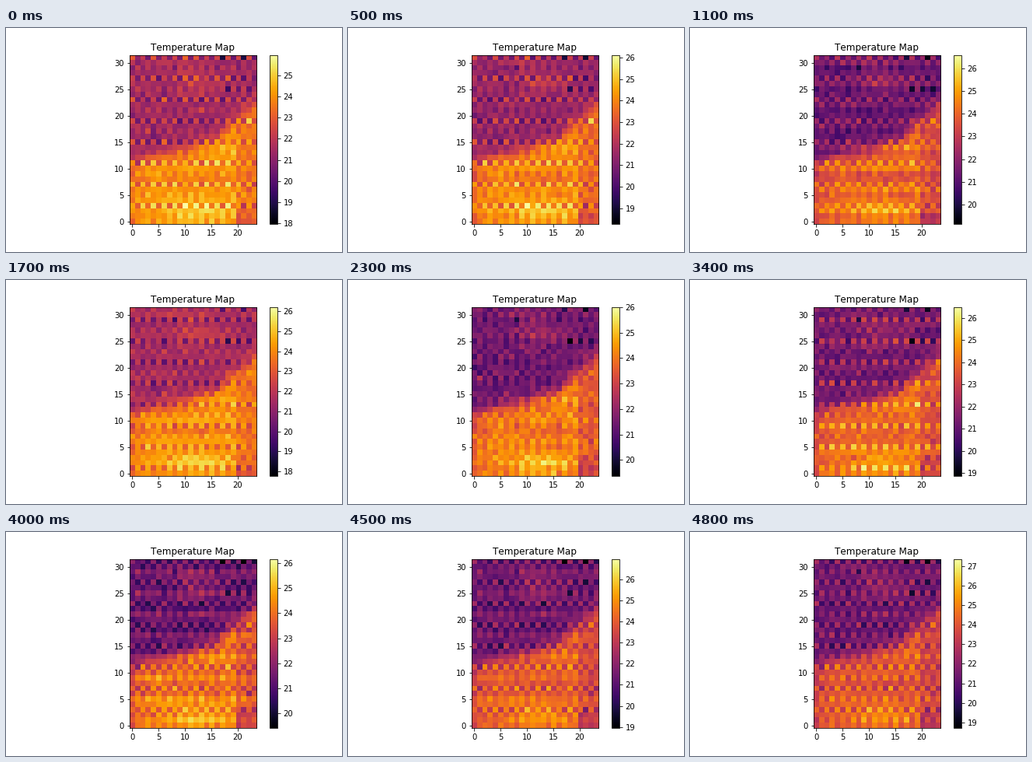
Recreate the animation shown at these times as a matplotlib script. Size 432 by 288 pixels, loop 5000 ms.

```python
import numpy as np
import matplotlib.pyplot as plt
from matplotlib.animation import FuncAnimation
from matplotlib.ticker import MultipleLocator

COLS, ROWS = 24, 32
STEP, FRAMES = 100, 50        # ms per frame, frames per loop
READINGS = 18
PERIOD = 4800 / 17            # ms between sensor readings

plt.rcParams.update({"font.family": "DejaVu Sans", "font.size": 10,
                     "text.kerning_factor": 6})

# Key points of the colour range, by reading
RANGE_KEYS = [0, 4, 6, 8, 12, 14, 17]
LOWS = [17.97, 19.14, 17.77, 19.37, 18.86, 19.42, 18.72]
HIGHS = [25.97, 26.6, 26.22, 26.01, 26.5, 26.16, 27.36]

COLD_SPOTS = [(8, 29), (18, 25), (20, 25), (22, 25), (17, 31), (21, 31)]

x, y = np.meshgrid(np.arange(COLS), np.arange(ROWS))


def bump(cx, cy, width, height):
    return np.exp(-((x - cx) / width) ** 2 - ((y - cy) / height) ** 2)


def scene():
    """Warm silhouette with a rising right shoulder in a cool room."""
    edge = np.interp(x, [0, 6, 11, 16, 18, 23], [11.5, 12.5, 14, 15.8, 18, 22.2])
    warm = 1 / (1 + np.exp((y - edge) / 0.7))
    hot = 24.1 - 0.6 * np.exp(-x / 1.5) - 0.3 * bump(10, 8, 20, 1)
    hot += 0.9 * bump(13, 2, 8, 2) + 0.35 * bump(16, 14, 4, 1.5)
    hot -= np.where(x > 19, 0.5 + 0.7 * (y < 4), 0)
    cold = 21.45 + 0.7 * bump(13, 26, 5, 2) + 0.4 * bump(7, 30, 6, 1.5)
    field = warm * hot + (1 - warm) * cold
    field += np.random.default_rng(4).normal(0, 0.2, field.shape)
    for cx, cy in COLD_SPOTS:
        field[cy, cx] -= 1
    return field


BASE = scene()


def interference(k):
    """Row offsets and left-right alternation, repeating every four rows."""
    slow = 2 * np.pi * k / READINGS
    beat = np.cos(np.pi * k / 3)
    offset = np.array([-0.1, -0.35, 0.3, 0.2]) * np.sin(slow)
    swing = np.array([0.15,
                      -(0.5 + 0.4 * beat) * min(1, 0.4 + k / 8),
                      -(0.3 - 0.2 * beat),
                      0.6 + 0.4 * np.cos(slow)])
    swing[0] *= -1
    band = y % 4
    uneven = np.random.default_rng(9).uniform(0.7, 1.3, x.shape)
    return offset[band] + swing[band] * (-1.0) ** x * uneven


def reading(k):
    noise = np.random.default_rng(100 + k).normal(0, 0.15, x.shape)
    return BASE + interference(k) + noise


fig, ax = plt.subplots(figsize=(6, 4), dpi=72)
fig.subplots_adjust(left=0.125, right=0.9, bottom=0.125, top=0.88)
image = ax.imshow(BASE, cmap="inferno", origin="lower", interpolation="nearest")
ax.set_title("Temperature Map")
ax.xaxis.set_major_locator(MultipleLocator(5))
ax.yaxis.set_major_locator(MultipleLocator(5))
fig.colorbar(image, ax=ax, ticks=MultipleLocator(1))


def draw(frame):
    k = int((frame + 0.5) * STEP / PERIOD)
    image.set_data(reading(k))
    image.set_clim(np.interp(k, RANGE_KEYS, LOWS), np.interp(k, RANGE_KEYS, HIGHS))
    return [image]


anim = FuncAnimation(fig, draw, frames=FRAMES, interval=STEP,
                     repeat=True, repeat_delay=0, blit=False)
plt.show()
```
